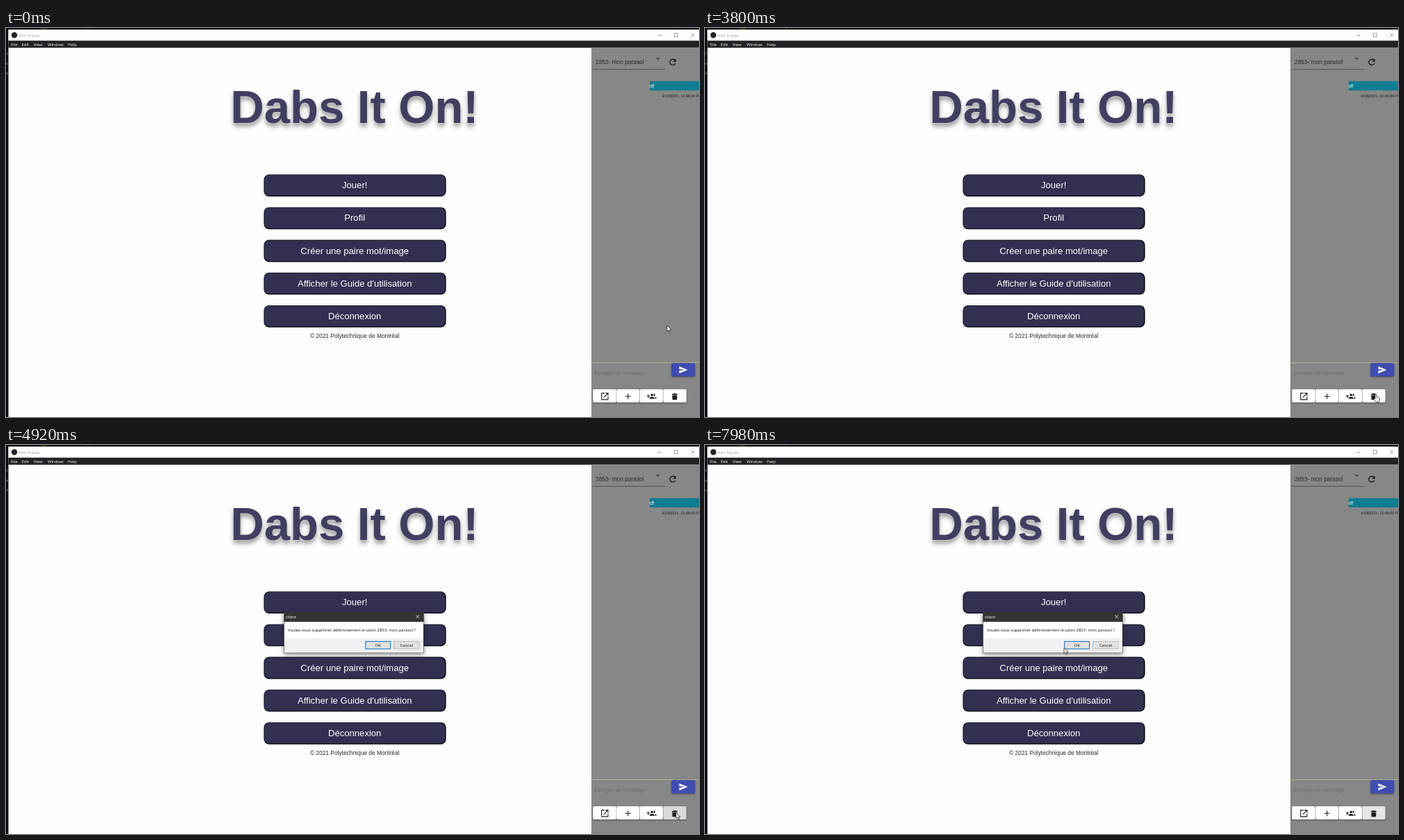
Recreate the animation shown at these times as an HTML page. Size 998 by 561 pixels, loop 8 s.

```html
<!DOCTYPE html>
<html lang="fr">
<head>
<meta charset="utf-8">
<title>Kilo Tracés</title>
<style>
html, body { margin: 0; width: 100%; height: 100%; overflow: hidden; background: #fdfdfd; }
svg { display: block; width: 100vw; height: 100vh; }
text { font-family: "Liberation Sans", Arial, sans-serif; }
.ui text { font: 6px "Open Sans", "Noto Sans", sans-serif; }
.ui .message { font-size: 5.9px; }
.heading {
  font-size: 67px; font-weight: bold; fill: #423e61;
  filter: drop-shadow(0 1.4px 0 #cbcbcb) drop-shadow(0 4px 3px rgba(0, 0, 0, .38));
}
.menu text { font-size: 13.1px; fill: #fff; text-anchor: middle; }
.raised { filter: drop-shadow(0 1px 1px rgba(0, 0, 0, .4)); }
.dialog, .cursor, .arrow, .hand, .focus, .ripple { animation: 8s linear infinite; }
.dialog { transform-origin: 501px 271px; animation-name: open; }
.window { filter: drop-shadow(0 2px 3px rgba(0, 0, 0, .5)); }
.cursor { animation-name: move; }
.arrow { animation-name: arrow; animation-timing-function: step-end; }
.hand { animation-name: hand; animation-timing-function: step-end; }
.focus { animation-name: focus; }
.ripple { transform-origin: 966px 528px; animation-name: ripple; }

@keyframes move {
  0%, 3% { transform: translate(952px, 429px); animation-timing-function: ease-in-out; }
  10.2%, 20.5% { transform: translate(989.5px, 496px); animation-timing-function: ease-in-out; }
  28%, 54.3% { transform: translate(966px, 528px); }
  57%, 63% { transform: translate(965px, 530px); animation-timing-function: ease-in-out; }
  75%, 83% { transform: translate(504px, 276px); animation-timing-function: ease-in-out; }
  95%, 100% { transform: translate(517px, 292.5px); }
}
@keyframes arrow {
  0% { opacity: 1; }
  8.4% { opacity: 0; }
  22.7% { opacity: 1; }
  25.8% { opacity: 0; }
  53.8%, 100% { opacity: 1; }
}
@keyframes hand {
  0% { opacity: 0; }
  8.4% { opacity: 1; }
  22.7% { opacity: 0; }
  25.8% { opacity: 1; }
  53.8%, 100% { opacity: 0; }
}
@keyframes open {
  0%, 53.9% { opacity: 0; transform: scale(.95); }
  54.25% { opacity: .1; transform: scale(.955); }
  56.8%, 100% { opacity: 1; transform: none; }
}
@keyframes focus {
  0%, 53.2% { opacity: 0; }
  54%, 100% { opacity: .1; }
}
@keyframes ripple {
  0%, 53.2% { opacity: .1; transform: scale(0); }
  54.25% { opacity: .1; transform: scale(.7); }
  57%, 62% { opacity: .05; transform: scale(1.3); }
  65%, 100% { opacity: 0; transform: scale(1.3); }
}
</style>
</head>
<body>
<svg viewBox="0 0 998 561">
  <defs>
    <g id="button">
      <rect x="371.3" width="262.4" height="31.8" rx="7.5" fill="#100f19"/>
      <rect x="372.1" y=".8" width="260" height="29.6" rx="6.7" fill="#333051"/>
    </g>
    <clipPath id="trash"><rect x="946" y="521" width="34" height="19" rx="2"/></clipPath>
    <clipPath id="edge"><rect width="3.2" height="561"/></clipPath>
  </defs>

  <rect width="998" height="561" fill="#fdfdfd"/>
  <rect width="998" height="2.5" fill="#0b090c"/>
  <path d="M50 .8h9M117 .8h2" stroke="#5b5422"/>
  <rect y="2" width="3.5" height="559" fill="#0b0b0f"/>
  <g class="ui" clip-path="url(#edge)" fill="#aaa">
    <text x="0" y="39">1</text><text x="0" y="53">s</text><text x="0" y="67">s</text>
  </g>

  <g class="ui">
    <rect x="3.5" y="2.5" width="995" height="16" fill="#fff"/>
    <circle cx="12" cy="10.2" r="4.2" fill="#22242e"/>
    <text x="19" y="12.5" fill="#999">Kilo Tracés</text>
    <path d="M938.5 10.5h5.5M962.5 7.7h5v5h-5zM986.5 7.5l5 5m0-5l-5 5" fill="none" stroke="#777" stroke-width=".7"/>
    <rect x="3.5" y="18.3" width="995" height="10.2" fill="#222224"/>
    <g fill="#fff">
      <text x="7" y="25.6">File</text>
      <text x="22.5" y="25.6">Edit</text>
      <text x="39.7" y="25.6">View</text>
      <text x="60" y="25.6">Window</text>
      <text x="89" y="25.6">Help</text>
    </g>
  </g>

  <text class="heading" x="502" y="136.5" text-anchor="middle">Dabs It On!</text>

  <g class="menu">
    <use href="#button" y="211.2"/><text x="502.2" y="231.2">Jouer!</text>
    <use href="#button" y="258.4"/><text x="502.2" y="278.4">Profil</text>
    <use href="#button" y="305.6"/><text x="502.2" y="325.6">Créer une paire mot/image</text>
    <use href="#button" y="352.7"/><text x="502.2" y="372.8">Afficher le Guide d'utilisation</text>
    <use href="#button" y="399.9"/><text x="502.2" y="420">Déconnexion</text>
  </g>
  <text x="502.2" y="447" font-size="8.4" text-anchor="middle" fill="#2b2b2b">© 2021 Polytechnique de Montréal</text>

  <g class="chat">
    <rect x="843" y="28.5" width="155" height="533" fill="#878787"/>
    <text x="849" y="52" font-size="8.35" fill="#292929">2853- mon parasol</text>
    <path d="M845 59.6h104.5" stroke="#484848" stroke-width=".8"/>
    <path d="M935.7 43h6l-3 3z" fill="#404040"/>
    <path d="M963.1 46.1A4.2 4.2 0 1 0 964.1 51" fill="none" stroke="#151515" stroke-width="1.3"/>
    <path d="M964.8 44.5v4.3h-4.3z" fill="#151515"/>

    <rect x="927" y="76.7" width="71" height="13.4" fill="#107c91"/>
    <text x="927" y="86" font-size="7.5" fill="#fff">df</text>
    <text x="944.5" y="100.3" font-size="5.4" fill="#181818">4/18/2021, 12:46:00 PM</text>

    <path d="M843 482.7h155" stroke="#bdb998" stroke-width=".9"/>
    <text x="847" y="499.5" font-size="7.8" fill="#6b6b6b">Envoyer un message</text>
    <rect class="raised" x="958.3" y="483.2" width="34" height="19.4" rx="2" fill="#3f4cb0"/>
    <path d="M969.5 498.3l12.2-5.2-12.2-5.2v4l8.7 1.2-8.7 1.2z" fill="#fff"/>

    <g class="raised" fill="#fff">
      <rect x="845.3" y="521" width="33.5" height="19" rx="2"/>
      <rect x="879.2" y="521" width="33.2" height="19" rx="2"/>
      <rect x="912.8" y="521" width="33.2" height="19" rx="2"/>
      <rect x="946.4" y="521" width="33.4" height="19" rx="2"/>
    </g>
    <g clip-path="url(#trash)">
      <rect class="focus" x="946" y="521" width="34" height="19"/>
      <circle class="ripple" cx="966" cy="528" r="20"/>
    </g>
    <path d="M862 526.6h-4.3v9.3h9.3v-4.3M863.2 526.6h3.8v3.8M867 526.6l-6.2 6.2M891.8 531.2h8M895.8 527.2v8" fill="none" stroke="#1c1c1c" stroke-width="1.1"/>
    <g fill="#1c1c1c">
      <path d="M922.7 530.5h4.6v1.1h-4.6zM924.5 528.8h1.1v4.6h-1.1z"/>
      <circle cx="930.3" cy="529.2" r="1.7"/>
      <path d="M926.9 534.8v-1.2c0-2.1 6.8-2.1 6.8 0v1.2z"/>
      <path d="M932.6 527.6a1.7 1.7 0 1 1 0 3.2q.8-1.6 0-3.2zM934.2 532c1.4.2 2.4.8 2.4 1.7v1.1h-1.8v-1.2q0-.9-.6-1.6z"/>
      <path d="M959 527.8h2l.6-.7h2.8l.6.7h2v1.1h-8zM959.6 529.5h6.8v5.7q0 1.1-1.1 1.1h-4.6q-1.1 0-1.1-1.1z"/>
    </g>
  </g>

  <g class="dialog ui">
    <g class="window">
      <rect x="400.3" y="241" width="201.2" height="59" fill="#555"/>
      <rect x="400.8" y="255" width="200.2" height="24" fill="#fff"/>
      <rect x="400.8" y="278.5" width="200.2" height="21" fill="#f0f0f2"/>
      <rect x="400.3" y="241" width="201.2" height="14" fill="#343434"/>
    </g>
    <text x="403" y="249.8" fill="#fff">client</text>
    <path d="M590.5 245.2l4.6 4.6m0-4.6l-4.6 4.6" stroke="#fff" stroke-width=".8"/>
    <text class="message" x="406" y="268.6" fill="#111">Voulez-vous supprimer définitivement le salon 2853- mon parasol ?</text>
    <rect x="517.8" y="283.4" width="35.8" height="10.6" fill="#e1e1e1" stroke="#287fc5" stroke-width="1.2"/>
    <rect x="558.4" y="283.2" width="36.8" height="10.8" fill="#e1e1e1" stroke="#aaa" stroke-width=".7"/>
    <g text-anchor="middle" fill="#111">
      <text x="535.8" y="290.9">OK</text>
      <text x="576.8" y="290.9">Cancel</text>
    </g>
  </g>

  <g class="cursor" fill="#fff" stroke="#111" stroke-width=".7" stroke-linejoin="round">
    <path class="arrow" d="M0 0V8.6L2 6.8 3.4 9.9 4.7 9.3 3.3 6.3H6Z"/>
    <path class="hand" d="M-1 .9a1 1 0 0 1 2 0V4l3.4.8q1.4.4 1.2 1.9L4.8 11.4H.3L-3 7.1q.1-1.4 1.3-.9l.7.7Z"/>
  </g>
</svg>
</body>
</html>
```
